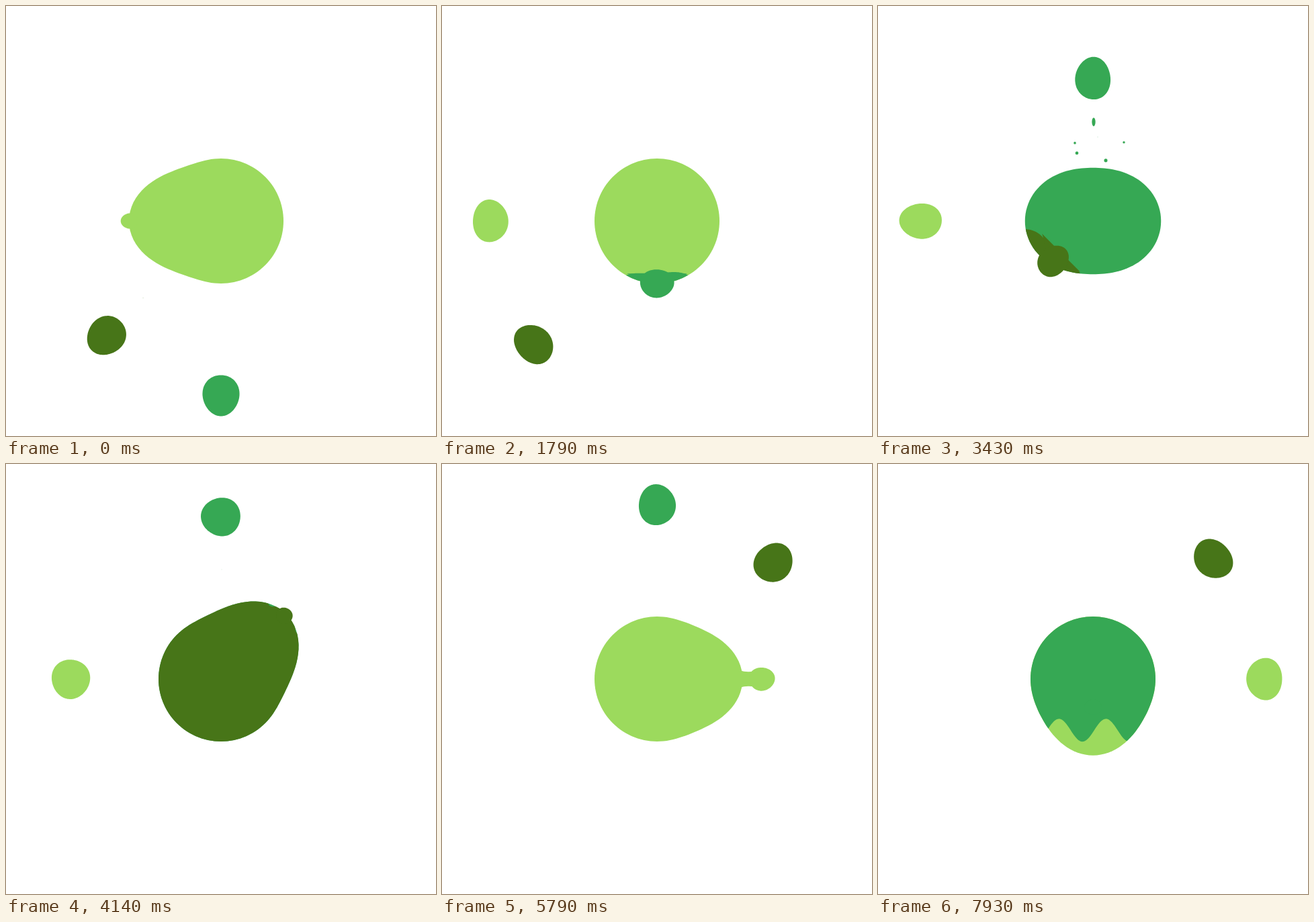
An HTML page with a canvas for the animation above (8000 ms loop, 640 by 640 pixels).

```html
<!DOCTYPE html>
<html lang="en">
<head>
<meta charset="utf-8">
<title>Liquid drops</title>
<style>
  html, body { margin: 0; width: 100%; height: 100%; overflow: hidden; background: #fff; }
  canvas { display: block; width: 100vmin; height: 100vmin; }
</style>
</head>
<body>
<canvas id="stage" width="640" height="640"></canvas>
<script>
const ctx = document.getElementById('stage').getContext('2d');
const { PI, cos, sin, exp, min, max, floor } = Math;
const LOOP = 8000, CENTER = 320;
const SWING = 5640;              // time between two passages of the same drop
const BLOB = 93, DROP = 29;      // radii at rest
const REACH = 266, ENTRY = 112, EXIT = 136;

const clamp = (x, lo = 0, hi = 1) => min(hi, max(lo, x));
const ramp = (x, from, to) => clamp((x - from) / (to - from));
const smooth = (x, from, to) => { const k = ramp(x, from, to); return k * k * (3 - 2 * k); };

// angle: direction of the first exit; transit: time spent inside the big blob
const drops = [
  { color: '#9cda5d', angle: PI, exit: 0, transit: 970 },
  { color: '#36a854', angle: -PI / 2, exit: 2640, transit: 920 },
  { color: '#477518', angle: -PI / 4, exit: 4150, transit: 810 }
];

// Every passage goes the opposite way to the one before.
const passes = drops.flatMap(drop => [-1, 0, 1].map(n => {
  const exit = drop.exit + n * SWING;
  return { drop, exit, enter: exit - drop.transit, angle: drop.angle + n * PI };
})).sort((a, b) => a.enter - b.enter);

// Place of a drop along its current direction, and its scale.
function dropState(drop, t) {
  const first = drop.exit - drop.transit;
  const n = floor((t - first) / SWING);
  const x = t - first - n * SWING;
  const inside = x < drop.transit;
  const s = inside
    ? -ENTRY + (ENTRY + EXIT) * x / drop.transit
    : REACH - (REACH - EXIT) * exp((drop.transit - x) / 900) - (REACH - ENTRY) * exp((x - SWING) / 400);
  const leaving = x > drop.transit / 2 && x < SWING - 1500;
  const scale = leaving ? clamp(0.42 + (s - EXIT) * 0.0105, 0.42) : clamp(0.8 + (s - 85) / 300, 0.8);
  return { s, scale, angle: drop.angle + n * PI };
}

const stretch = since => 44 * smooth(since, -560, -120) * (1 - smooth(since, 0, 500));
const recoil = since => -11 * sin(PI * ramp(since, 400, 1200));
const frontOf = (p, t) => -95 + 0.3 * (t - p.enter);

function blobRadius(angle, t) {
  let r = BLOB;
  for (const p of passes) {
    const since = t - p.exit, a = angle - p.angle;
    r += stretch(since) * max(0, cos(a)) ** 4 + recoil(since) * (0.25 + cos(2 * a));
  }
  return r;
}

function closedShape(rx, ry) {
  ctx.beginPath();
  for (let i = 0; i < 120; i++) {
    const a = i * PI / 60;
    ctx.lineTo(rx(a) * cos(a), ry(a) * sin(a));
  }
  ctx.closePath();
}

function blobPath(t) {
  const r = a => blobRadius(a, t);
  closedShape(r, r);
}

// Runs draw with x pointing along angle.
function inFrame(angle, color, draw) {
  ctx.save();
  ctx.rotate(angle);
  ctx.fillStyle = color;
  draw();
  ctx.restore();
}

function drawWave(p, t) {
  const front = frontOf(p, t), grown = ramp(front, -85, -40);
  const crest = 31 - 0.2 * front, length = 84 - 0.185 * front;
  ctx.save();
  blobPath(t);
  ctx.clip();
  inFrame(p.angle, p.drop.color, () => {
    ctx.beginPath();
    ctx.moveTo(-200, -160);
    for (let v = -160; v <= 160; v += 2) {
      const ripple = 17 * cos(2 * PI * (v - crest) / length);
      ctx.lineTo(front + grown * ripple - (1 - grown) * 0.007 * v * v, v);
    }
    ctx.lineTo(-200, 160);
    ctx.fill();
  });
  ctx.restore();
}

function drawDrop(drop, t) {
  const { s, scale, angle } = dropState(drop, t);
  const swell = 2.7 * cos(2 * PI * (t - 450) / 2900);
  const wobble = a => scale * (1 + 0.022 * cos(3 * a - t / 500));
  inFrame(angle, drop.color, () => {
    ctx.translate(s, 0);
    closedShape(a => (DROP + swell) * wobble(a), a => (DROP - swell) * wobble(a));
    ctx.fill();
  });
}

// Liquid bridge from the blob's edge (side: 1 ahead, -1 behind) to the drop.
function drawNeck(p, t, side, spread, waist) {
  const { s, scale } = dropState(p.drop, t);
  const base = p.angle + (side < 0 ? PI : 0);
  const r = min(blobRadius(base - spread, t), blobRadius(base + spread, t));
  const x = side * (r * cos(spread) - 3), y = r * sin(spread), w = 0.85 * DROP * scale;
  const mid = side > 0 ? (x + s) / 2 : min(s, x) * 0.6 + x * 0.4;
  inFrame(p.angle, p.drop.color, () => {
    ctx.beginPath();
    ctx.moveTo(x, -y);
    ctx.quadraticCurveTo(mid, -waist, s, -w);
    ctx.lineTo(s, w);
    ctx.quadraticCurveTo(mid, waist, x, y);
    ctx.fill();
  });
}

// Droplets slow down at a resting distance and shrink; the farther, the sooner.
const droplets = [[125, -27], [110, -24], [134, 7], [126, 46], [99, 19]];

function drawSplash(p, since) {
  const glide = exp((710 - since) / 100);
  const speck = (u, v, rx, ry, life) => {
    const k = 1 - ramp(since, 710, life);
    ctx.beginPath();
    ctx.ellipse(u, v, rx * k, ry * k, 0, 0, 2 * PI);
    ctx.fill();
  };
  inFrame(p.angle, p.drop.color, () => {
    speck(163 - 35 * glide, 1, 7, 2.9, 1550);
    for (const [rest, v] of droplets)
      speck(rest - 20 * glide, v, 3, 3, 1150 - 12 * (rest - 105));
  });
}

function draw(t) {
  ctx.setTransform(1, 0, 0, 1, 0, 0);
  ctx.fillStyle = '#fff';
  ctx.fillRect(0, 0, 640, 640);
  ctx.translate(CENTER, CENTER);

  ctx.fillStyle = passes.filter(p => frontOf(p, t) > 155).pop().drop.color;
  blobPath(t);
  ctx.fill();

  for (const p of passes) {
    const front = frontOf(p, t), since = t - p.exit;
    if (front > -95 && front <= 155) {
      drawWave(p, t);
      const { s } = dropState(p.drop, t);
      if (s < -68) drawNeck(p, t, -1, 0.1 + 0.42 * ramp(s, -118, -92), 20);
    }
    if (since >= 0 && since < 480) drawNeck(p, t, 1, 0.1, 11 * (1 - since / 480));
    if (since > 480 && since < 1550) drawSplash(p, since);
  }
  for (const drop of drops) drawDrop(drop, t);
}

function tick() {
  draw(performance.now() % LOOP);
  requestAnimationFrame(tick);
}
tick();
</script>
</body>
</html>
```
